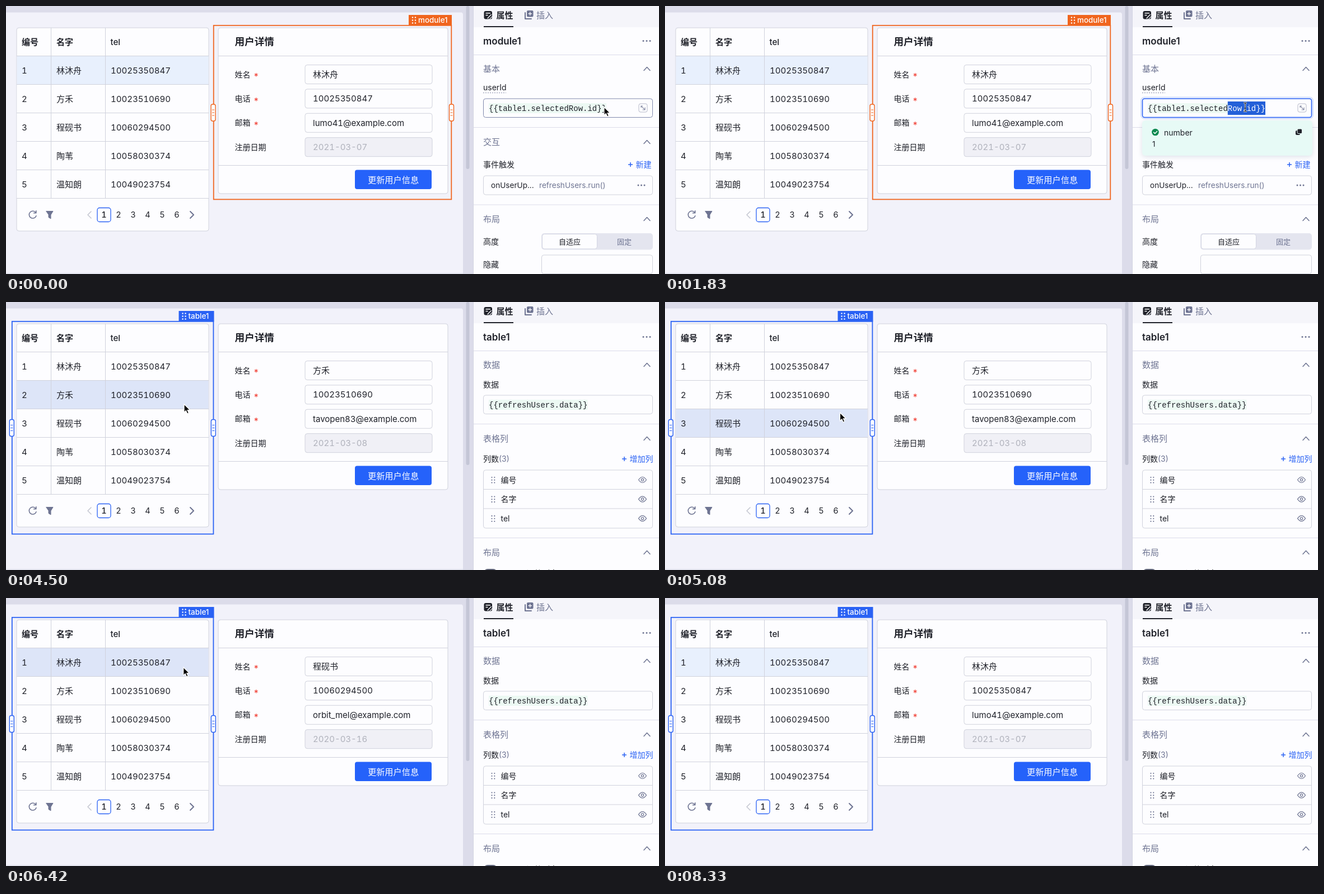
Write an HTML page that moves like this. It is 1166 px wide and 480 px high and loops after 8.41 s.

```html
<!DOCTYPE html>
<html lang="zh">
<head>
<meta charset="utf-8">
<title>Table and detail module</title>
<style>
html, body { margin: 0; width: 100%; height: 100%; overflow: hidden; }
svg { display: block; width: 1166px; height: 480px; font-family: Inter, "Noto Sans CJK SC", "Noto Sans CJK", sans-serif; }
.num { font-variant-numeric: tabular-nums; }
.code { font-family: "Liberation Mono", monospace; }
</style>
</head>
<body>
<svg id="stage" viewBox="0 0 1166 480"></svg>
<script>
const LOOP = 8410;
const INK = '#1f2129', GRAY = '#6e7492', LINE = '#d0d2dc', BLUE = '#2a62f4', ORANGE = '#f0651e', WHITE = '#fdfdff';
const CODE_X = 862, CHAR = 8.4, CODE_LEN = 25;
const ROW_H = 51, ROW_Y = 90;

const people = [
  { name: '林沐舟', tel: '10025350847', mail: 'lumo41@example.com', date: '2021-03-07' },
  { name: '方禾', tel: '10023510690', mail: 'tavopen83@example.com', date: '2021-03-08' },
  { name: '程砚书', tel: '10060294500', mail: 'orbit_mel@example.com', date: '2020-03-16' },
  { name: '陶苇', tel: '10058030374' },
  { name: '温知朗', tel: '10049023754' }
];

// Markup helpers; text is placed by its vertical centre
const text = (x, y, size, str, fill = INK, weight = 400, more = '') =>
  `<text x="${x}" y="${y + size * 0.37}" font-size="${size}" fill="${fill}" font-weight="${weight}" ${more}>${str}</text>`;
const rect = (x, y, w, h, fill, stroke = 'none', r = 0, more = '') =>
  `<rect x="${x}" y="${y}" width="${w}" height="${h}" rx="${r}" fill="${fill}" stroke="${stroke}" ${more}/>`;
const path = (d, stroke, width = 1, fill = 'none', more = '') =>
  `<path d="${d}" stroke="${stroke}" stroke-width="${width}" fill="${fill}" ${more}/>`;
const hline = (x1, x2, y, color = LINE) => path(`M${x1} ${y}H${x2}`, color);
const group = (id, body, more = '') => `<g id="${id}" ${more}>${body}</g>`;
const middle = 'text-anchor="middle"';
const round = 'stroke-linecap="round" stroke-linejoin="round"';

function dots(x, y, cols, rows, gap, r, fill) {
  let out = '';
  for (let i = 0; i < cols * rows; i++)
    out += `<circle cx="${x + (i % cols) * gap}" cy="${y + Math.floor(i / cols) * gap}" r="${r}" fill="${fill}"/>`;
  return out;
}
const handle = (x, y, color) =>
  rect(x - 4, y - 15, 8, 30, WHITE, color, 3, 'stroke-width="1.4"') +
  [-5, 0, 5].map(d => hline(x - 2, x + 2, y + d, color)).join('');
const tag = (x, w, name, color) =>
  rect(x, 16, w, 19, color) + dots(x + 7, 20.5, 2, 3, 5, 1.2, '#fff') + text(x + 17, 25.5, 13.4, name, '#fff', 500);
const outline = (x, y, w, h, color) => rect(x, y, w, h, 'none', color, 0, 'stroke-width="1.8"');
const section = (y, name) =>
  text(852, y, 15, name, GRAY, 500) + path(`M1139 ${y + 3}l5.5 -6l5.5 6`, GRAY, 1.5, 'none', round);
const divider = y => hline(835, 1166, y, '#dcdcea');
const plusLink = (x, y, label) =>
  path(`M${x} ${y}h8m-4 -4v8`, BLUE, 1.5) + text(x + 13.5, y, 14, label, BLUE);
const panelTitle = name => text(852, 63, 17, name, INK, 600);

function userTable() {
  let out = rect(19, 39, 343, 364, WHITE, LINE, 4);
  people.forEach((p, i) => { out += rect(19.5, ROW_Y + i * ROW_H, 342, ROW_H, WHITE, 'none', 0, `id="row${i}"`); });
  for (let i = 0; i < 6; i++) out += hline(19, 362, 89.5 + i * ROW_H);
  out += path('M80.5 39V344M177.5 39V344', LINE);
  out += text(28, 64, 15, '编号', INK, 600) + text(90, 64, 15, '名字', INK, 600) + text(186.5, 64, 15, 'tel', INK, 500);
  people.forEach((p, i) => {
    const y = 115 + i * ROW_H;
    out += text(28, y, 15, i + 1) + text(90, y, 15, p.name) + text(187, y, 15, p.tel);
  });
  out += path('M53.3 370.2A6.5 6.5 0 1 0 54 375.8M53.8 366.8V370.8H49.6', GRAY, 1.6, 'none', round);
  out += path('M72 367.5H84L80 374V381L76 378.5V374Z', GRAY, 1, GRAY, round);
  out += path('M152 368l-6 6l6 6', '#c6c8d2', 1.6, 'none', round) + path('M329 368l6 6l-6 6', GRAY, 2, 'none', round);
  out += rect(163, 361.5, 24, 25, WHITE, BLUE, 4, 'stroke-width="1.3"');
  for (let i = 0; i < 6; i++) out += text(175 + i * 26, 374, 14.5, i + 1, INK, i ? 400 : 500, middle);
  return group('table', out, 'class="num"');
}

function detailCard() {
  let out = rect(379, 39, 410, 297, WHITE, LINE, 4) + hline(379, 789, 89.5) + hline(379, 789, 285.5);
  out += text(408.5, 63, 17.6, '用户详情', INK, 600);
  ['姓名', '电话', '邮箱', '注册日期'].forEach((label, i) => {
    const y = 122.5 + i * 43.4, off = i === 3;
    out += text(408.5, y, 14, label);
    if (!off) out += text(441.5, y + 4, 16, '*', '#f0392f');
    out += rect(534, y - 17, 227, 34, off ? '#f0f0f6' : WHITE, LINE, 4);
    out += text(548, y, 15, '', off ? '#b0b2bc' : INK, 400, `id="field${i}"`);
  });
  out += rect(623, 293.5, 137, 34.5, '#2562fa', 'none', 4) + text(691.5, 311, 15.2, '更新用户信息', '#fff', 400, middle);
  return group('card', out, 'class="num"');
}

function tabs() {
  const head = rect(834, 0, 332, 480, WHITE) + rect(834, 0, 332, 38, '#f5f5fa') + path('M834.5 0V480', '#d3d4e2');
  const edit = rect(853.5, 9, 14.5, 14.5, INK, 'none', 3) +
    path('M856.5 12.8h8.5M856.5 16.6h4', '#fff', 1.5) +
    path('M861 23.2l6.8 -6.8', '#f5f5fa', 5) + path('M861.5 23l6.3 -6.3', INK, 2.4);
  const insert = path('M927 12V23H938', GRAY, 2, 'none', round) + rect(930, 8, 11.5, 11.5, GRAY, 'none', 2) +
    path('M935.7 10.5v6.4m-3.2 -3.2h6.4', '#f5f5fa', 1.4);
  return head + edit + insert + text(875.5, 16.5, 15, '属性', INK, 600) + text(947, 16.5, 15, '插入', GRAY, 500) +
    rect(853, 36, 53, 2, INK) + dots(1138, 62.5, 3, 1, 6, 1.5, GRAY) + divider(87.5);
}

function modulePanel() {
  let out = panelTitle('module1') + section(112.5, '基本');
  out += text(852, 146, 14, 'userId') + path('M852 155.5H893', '#8a8fa8', 1, 'none', 'stroke-dasharray="2 2"');
  out += rect(850, 163.5, 307, 38, 'none', '#d5e1fd', 6, 'id="glow" stroke-width="2"');
  out += rect(852.5, 166, 302, 33.5, WHITE, LINE, 4, 'id="input"');
  out += rect(CODE_X, 174, CODE_LEN * CHAR, 18, '#ecf9f3');
  out += group('braces', rect(CODE_X, 174, CHAR, 18, '#c2ecd0') + rect(CODE_X + 24 * CHAR, 174, CHAR, 18, '#c2ecd0'));
  const code = fill => text(CODE_X, 182.5, 14, '{{table1.selectedRow.id}}', fill, 400, 'class="code"');
  out += code(INK);
  out += `<clipPath id="selClip">${rect(0, 171, 0, 24, '#000', 'none', 0, 'id="selBox"')}</clipPath>`;
  out += `<g clip-path="url(#selClip)">${rect(CODE_X, 171, CODE_LEN * CHAR, 24, '#2460d8')}${code('#fff')}</g>`;
  out += group('expand', rect(1130, 175, 15, 15, WHITE, '#b6b9c9', 3) +
    path('M1134 179l6.5 6.5M1141 181.5v4.5h-4.5M1134 182v-3h3', '#8d92aa', 1.2));
  out += divider(217.5) + section(243.5, '交互') + text(852, 284, 14, '事件触发') + plusLink(1111, 284, '新建');
  out += rect(852.5, 304, 302, 34, WHITE, LINE, 4) + text(866, 321, 13.6, 'onUserUp...') +
    text(952, 321, 13.6, 'refreshUsers.run()', GRAY) + dots(1129, 321, 3, 1, 5.5, 1.5, GRAY);
  out += divider(356) + section(381.5, '布局') + text(852, 422, 14, '高度');
  out += rect(956, 407, 199, 29.5, '#e4e5ef', 'none', 5) + rect(957.5, 408.5, 98, 26.5, WHITE, '#d3d5e2', 4);
  out += text(1006.5, 422, 13, '自适应', INK, 500, middle) + text(1104, 422, 13, '固定', GRAY, 400, middle);
  out += text(852, 463, 14, '隐藏') + rect(956.5, 446, 198, 33.5, WHITE, LINE, 4);
  out += group('popover',
    rect(852, 205, 304, 63, '#e7faf6', 'none', 6, 'style="filter:drop-shadow(0 2px 4px rgba(60,80,120,.16))"') +
    '<circle cx="875.5" cy="226" r="6.3" fill="#0c8a50"/>' +
    path('M872.6 226.2l2.2 2.2l3.8 -4', '#fff', 1.5, 'none', round) +
    text(891, 226.5, 14, 'number') + text(870, 247, 13.5, '1') +
    rect(1126, 223, 8, 8, INK, 'none', 2) + rect(1129, 220, 8.5, 8.5, INK, '#e7faf6', 2));
  return group('modulePanel', out);
}

function tablePanel() {
  let out = panelTitle('table1') + section(112.5, '数据') + text(852, 148, 14, '数据');
  out += rect(852.5, 167, 302, 33.5, WHITE, LINE, 4) + rect(CODE_X, 175, 21 * CHAR, 18, '#ecf9f3');
  out += text(CODE_X, 183.5, 14, '{{refreshUsers.data}}', INK, 400, 'class="code"');
  out += divider(218.5) + section(244.5, '表格列');
  out += text(852, 281, 14, '列数<tspan fill="#6e7492">(3)</tspan>') + plusLink(1100, 281, '增加列');
  out += rect(852.5, 301, 302, 104, WHITE, LINE, 4) + hline(852, 1155, 335.5) + hline(852, 1155, 370);
  ['编号', '名字', 'tel'].forEach((name, i) => {
    const y = 318.5 + i * 34.6;
    out += dots(867.5, y - 4.5, 2, 3, 4.8, 1.1, GRAY) + text(883.5, y, 14, name);
    out += path(`M1129.5 ${y}Q1136.5 ${y - 10} 1143.5 ${y}Q1136.5 ${y + 10} 1129.5 ${y}Z`, GRAY, 1.2);
    out += `<circle cx="1136.5" cy="${y}" r="2.2" fill="none" stroke="${GRAY}" stroke-width="1.2"/>`;
  });
  out += divider(422.5) + section(448.5, '布局');
  out += rect(853, 478, 24, 14, '#60657a', 'none', 7) + text(887, 485.5, 14, '显示可调整列宽');
  return group('tablePanel', out);
}

document.getElementById('stage').innerHTML =
  rect(0, 0, 1166, 480, '#dcdcea') + path('M0 11.5H812Q816 11.5 816 15.5V480H0Z', 'none', 0, '#f2f2fa') +
  rect(821.5, 0, 6, 292, '#c4c6d6', 'none', 3) + hline(0, 834, 479, '#d5d6e2') +
  userTable() + detailCard() +
  group('moduleFrame', outline(370.7, 34.8, 424.6, 311.6, ORANGE) + tag(719, 77, 'module1', ORANGE) +
    handle(370, 191, ORANGE) + handle(795.5, 191, ORANGE)) +
  group('tableFrame', outline(10.8, 34.8, 359.6, 380.8, BLUE) + tag(308.5, 63, 'table1', BLUE)) +
  group('tableHandles', handle(10.3, 225.5, BLUE) + handle(370.3, 225.5, BLUE)) +
  tabs() + modulePanel() + tablePanel() +
  rect(1161, 90, 5, 252, '#c4c6d0', 'none', 2.5, 'id="scrollbar"') +
  group('arrow', path('M0 0V14.6L3.3 11.5L5.7 17L8.3 15.9L6 10.5H10.5Z', '#fff', 1.2, '#000')) +
  group('beam', path('M-3 -8Q0 -8 0 -5.5Q0 -8 3 -8M0 -6V6M-3 8Q0 8 0 5.5Q0 8 3 8', '#fff', 2.6) +
    path('M-3 -8Q0 -8 0 -5.5Q0 -8 3 -8M0 -6V6M-3 8Q0 8 0 5.5Q0 8 3 8M-1.5 2H1.5', '#111', 1.1));

const el = {};
document.querySelectorAll('[id]').forEach(n => { el[n.id] = n; });

// Pointer stops: time, x, y
const stops = [
  [80, 1068, 181], [250, 1071, 183], [420, 1071, 183], [1250, 866, 182], [1330, 866, 182],
  [1500, 849, 190], [1590, 849, 190], [1830, 1036, 181], [2170, 1076, 183], [2340, 1076, 183],
  [3250, 330, 178], [3500, 322, 173], [3900, 322, 173], [4250, 318, 183], [4500, 318, 183],
  [4750, 313, 203], [4980, 313, 203], [5580, 306, 141], [5670, 306, 141], [5920, 316, 123],
  [6300, 316, 123], [6840, 322, 131], [6925, 322, 131], [7170, 865, 390], [7500, 1140, 486]
];
function pointer(t) {
  const i = stops.findIndex(s => s[0] > t);
  if (i < 1) return (i ? stops[stops.length - 1] : stops[0]).slice(1);
  const [t0, x0, y0] = stops[i - 1], [t1, x1, y1] = stops[i];
  const u = (t - t0) / (t1 - t0), e = u * u * (3 - 2 * u);
  return [x0 + (x1 - x0) * e, y0 + (y1 - y0) * e];
}
const clamp = (v, lo, hi) => Math.min(hi, Math.max(lo, v));
const show = (node, on) => node.setAttribute('visibility', on ? 'visible' : 'hidden');
const set = (node, attrs) => { for (const k in attrs) node.setAttribute(k, attrs[k]); };
// Selected person, switching at the given times
const chosen = (t, second, third, first) => t < second || t >= first ? 0 : t < third ? 1 : 2;

function draw(t) {
  const [x, y] = pointer(t);
  const tableOn = t >= 4000, focused = t >= 440 && !tableOn;
  const overInput = !tableOn && x > 852 && x < 1155 && y > 165 && y < 200;
  const overTable = x > 10 && x < 371 && t < 7500;

  const selected = chosen(t, 4000, 5080, 6400);
  const hovered = overTable && x < 362 ? Math.floor((y - ROW_Y) / ROW_H) : -1;
  people.forEach((p, i) => {
    const fill = i === selected ? (i === hovered ? '#dde5f8' : '#e8f0fd') : i === hovered ? '#f8f8fc' : WHITE;
    set(el['row' + i], { fill });
  });
  const person = people[chosen(t, 4160, 5170, 6490)];
  ['name', 'tel', 'mail', 'date'].forEach((key, i) => { el['field' + i].textContent = person[key]; });

  show(el.moduleFrame, !tableOn);
  show(el.tableFrame, tableOn || overTable);
  show(el.tableHandles, tableOn);
  el.modulePanel.style.display = tableOn ? 'none' : '';
  el.tablePanel.style.display = tableOn ? '' : 'none';

  set(el.input, {
    stroke: focused ? BLUE : overInput ? '#8089ac' : LINE,
    'stroke-width': focused ? 1.6 : 1
  });
  show(el.glow, focused);
  show(el.expand, overInput);
  set(el.popover, { opacity: clamp((t - 480) / 200, 0, 1) });

  const dragging = t >= 440 && t < 2420;
  const col = dragging ? clamp(Math.round((pointer(t - 60)[0] - CODE_X) / CHAR), 0, CODE_LEN) : CODE_LEN;
  set(el.selBox, { x: CODE_X + col * CHAR, width: (CODE_LEN - col) * CHAR });
  show(el.braces, focused && col === CODE_LEN);

  set(el.scrollbar, { opacity: t < 7100 ? 0 : clamp((8330 - t) / 160, 0, 1) });
  const beam = t >= 80 && !tableOn && x > 840;
  show(el.beam, beam);
  show(el.arrow, !beam && t < 7500);
  set(beam ? el.beam : el.arrow, { transform: `translate(${x} ${y})` });
}

const start = performance.now();
function tick() {
  draw((performance.now() - start) % LOOP);
  requestAnimationFrame(tick);
}
tick();
</script>
</body>
</html>
```
